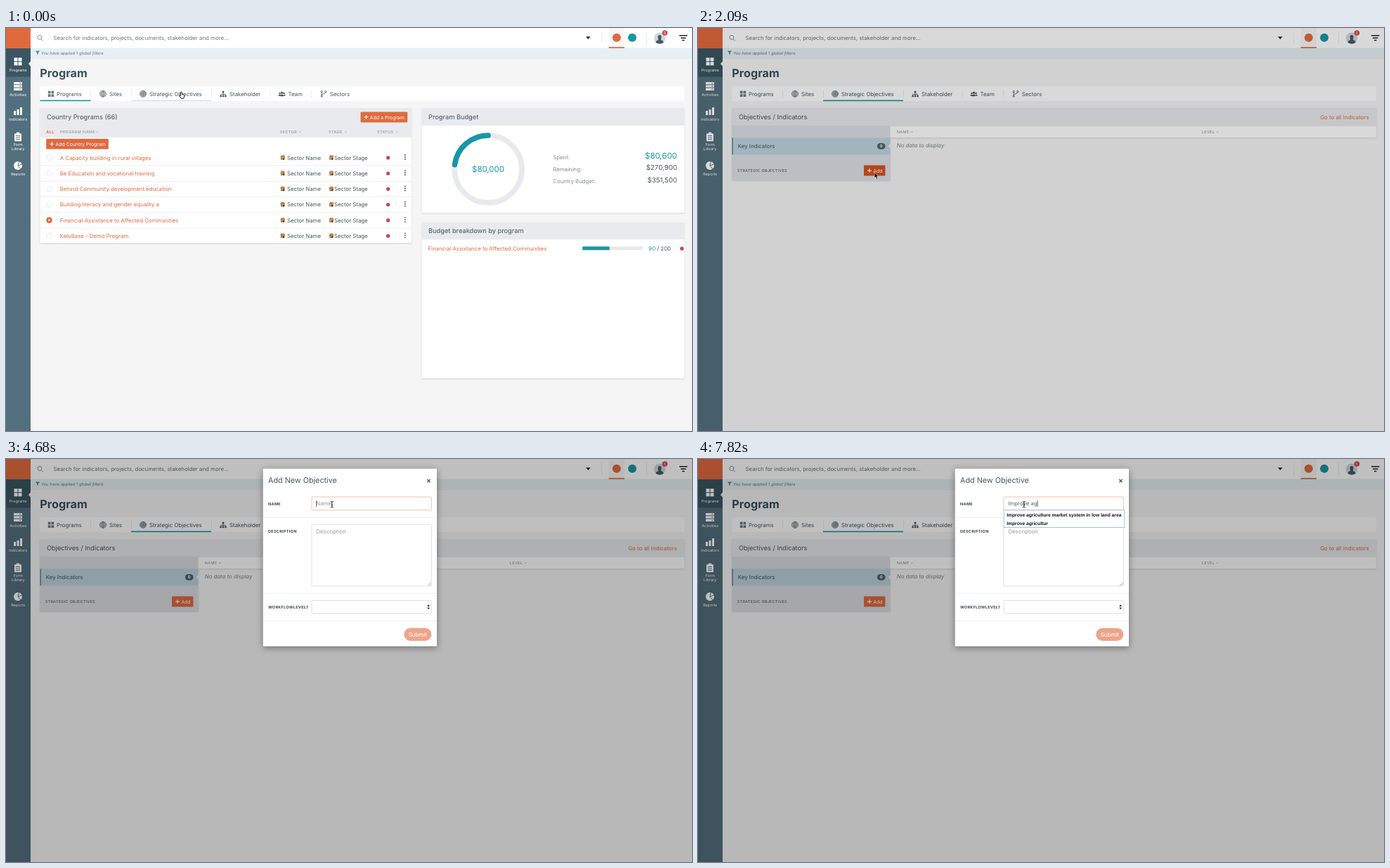
An HTML page that plays this animation: 976x574 px, repeating every 8 s.

```html
<!DOCTYPE html>
<html lang="en">
<head>
<meta charset="utf-8">
<title>Add objective</title>
<style>
  html, body { margin: 0; width: 100%; height: 100%; overflow: hidden; background: #f5f5f5; }
  svg { display: block; width: 976px; height: 574px; font-family: Inter, "Open Sans", sans-serif; text-rendering: geometricPrecision; }
  text { white-space: pre; }
  .caps { font-size: 5.5px; letter-spacing: .4px; }
  .mid { text-anchor: middle; }
  .end { text-anchor: end; }
  .bold { font-weight: 700; }
  .italic { font-style: italic; }
  .card { filter: drop-shadow(0 1px 1px rgba(0,0,0,.12)); }
  #modal { filter: drop-shadow(0 2px 5px rgba(0,0,0,.4)); }
  #list text { font-family: "Liberation Sans", Arial, sans-serif; font-weight: 700; }
</style>
</head>
<body>
<svg id="stage" viewBox="0 0 976 574"></svg>
<script>
const INK = '#46545d', GREY = '#868c91', ORANGE = '#e06a3e', TEAL = '#1796a6', SLATE = '#536f7d', PANEL = '#e8eaed', LINE = '#e6e7e9';

const text = (s, x, y, size = 7.85, fill = INK, cls = '') =>
  `<text x="${x}" y="${y}" font-size="${size}" fill="${fill}" class="${cls}">${s}</text>`;
const caps = (s, x, y, fill = GREY, cls = '') => text(s, x, y, 5.5, fill, 'caps ' + cls);
const rect = (x, y, w, h, fill, more = '') => `<rect x="${x}" y="${y}" width="${w}" height="${h}" fill="${fill}" ${more}/>`;
const dot = (x, y, r, fill, more = '') => `<circle cx="${x}" cy="${y}" r="${r}" fill="${fill}" ${more}/>`;
const path = (d, fill = 'none', stroke = 'none', width = 1, more = '') =>
  `<path d="${d}" fill="${fill}" stroke="${stroke}" stroke-width="${width}" ${more}/>`;
const group = (body, more = '') => `<g ${more}>${body}</g>`;
const place = (x, y, body) => group(body, `transform="translate(${x} ${y})"`);
const sortArrow = (x, y) => path(`M${x} ${y - .7}l1.3 1.4 1.3-1.4`, 'none', GREY, .7);
const plus = (x, y) => path(`M${x - 3} ${y}h6M${x} ${y - 3}v6`, 'none', '#fff', 1.1);
const button = (s, x, y, w, h) =>
  rect(x, y, w, h, ORANGE, 'rx="1.2" class="button"') + plus(x + 8, y + h / 2) + text(s, x + 13.3, y + h / 2 + 2.6, 6.95, '#fff');

// Icons are drawn around their own centre.
const tiles = (c, s) => [[-1, -1], [1, -1], [-1, 1], [1, 1]]
  .map(([i, j]) => rect(i * (s / 2 + .5) - s / 2, j * (s / 2 + .5) - s / 2, s, s, c)).join('');
const icons = {
  servers: [-4.4, -.1, 4.2].map(y => rect(-6, y - 1.7, 12, 3.4, '#fff', 'rx=".6"') + rect(2, y - .4, 2.6, .8, SLATE)).join(''),
  bars: rect(-6, -1, 3, 6, '#fff') + rect(-1.5, -3, 3, 8, '#fff') + rect(3, -6, 3, 11, '#fff'),
  clipboard: rect(-5, -4.8, 10, 11, '#fff', 'rx="1"') + rect(-2.2, -6.4, 4.4, 2.8, '#fff', 'rx="1"') +
    path('M-3-1.5h6M-3 1h6M-3 3.5h6', 'none', SLATE, .9),
  pie: dot(0, 0, 6, '#fff') + path('M0 0L1.5-6M0 0L5.8-2M0 0L4 5', 'none', SLATE, 1),
  globe: dot(0, 0, 4.5, 'none', `stroke="${INK}" stroke-width=".7"`) +
    path('M-4.5 0h9M0-4.5v9M-3.8-2.2h7.6M-3.8 2.2h7.6M0-4.5q-4.4 4.5 0 9q4.4-4.5 0-9', 'none', INK, .6),
  target: dot(0, 0, 4.5, '#bfc4c8', `stroke="${INK}" stroke-width=".7"`) + dot(0, 0, 2.6, 'none', `stroke="${INK}" stroke-width=".7"`) +
    dot(0, 0, 1, INK) + path('M0 0V-4.5A4.5 4.5 0 0 1 4.2 1.5Z', '#8b959b'),
  tree: dot(0, -2.8, 1.5, INK) + path('M0-2V3M-3.4 3V.6H3.4V3', 'none', INK, .8) + [-3.4, 0, 3.4].map(x => rect(x - 1.2, 2, 2.4, 2.4, INK)).join(''),
  people: [[-3, -.8, 1.2], [3, -.8, 1.2], [0, -1.6, 1.6]].map(([x, y, r]) => dot(x, y, r, INK)).join('') +
    path('M-5 3V1.6q2-1.5 3.2 0V3ZM5 3V1.6q-2-1.5-3.2 0V3ZM-2.4 3.4V2q2.4-2.4 4.8 0V3.4Z', INK),
  branch: path('M-2.6-3V3.2M-2.6 2q0-1.7 2.6-2T3-3', 'none', INK, .8) + [[-2.6, -3.2], [-2.6, 3.4], [3, -3.2]].map(([x, y]) => dot(x, y, 1.2, '#fff', `stroke="${INK}" stroke-width=".8"`)).join(''),
  building: path('M-3.2-1.8L-2-3.4H2L3.2-1.8V0H-3.2Z', '#b98a44') + rect(-2.8, 0, 5.6, 3, '#8d6a3d') + rect(-1.8, .7, 1.3, 1.2, '#e8d3a2') + rect(.5, .7, 1.3, 2.3, '#4f3a24'),
  funnel: path('M-3.2-2.6h6.4L.8.2V2.6l-1.6-.6V.2Z', '#6c8590'),
};

function sidebar() {
  const items = [
    [47.8, tiles('#fff', 5), ['Programs', 61.5]], [83, icons.servers, ['Activities', 97]],
    [119, icons.bars, ['Indicators', 132.3]], [155, icons.clipboard, ['Form', 168.4], ['Library', 174.2]],
    [196, icons.pie, ['Reports', 209.7]],
  ];
  return rect(0, 0, 35, 574, SLATE) + rect(0, 0, 35, 29, ORANGE) + rect(0, 29, 35, 40.5, '#3b5562') +
    path('M35 47.5l-3 3.5 3 3.5Z', '#f5f5f5') +
    items.map(([y, icon, ...labels]) => place(17, y, icon) +
      labels.map(([s, ly]) => text(s, 17.2, ly, 5.5, '#fff', 'mid')).join('')).join('');
}

function header() {
  return rect(35, 0, 941, 29, '#fff') + rect(35, 28.5, 941, 14.5, '#e5f0f3') + rect(35, 43, 941, .6, '#dfe6e8') +
    path('M50.2 15.8l2.5 2.6', 'none', '#7d868c', 1) + dot(47.9, 13.4, 3, 'none', 'stroke="#7d868c" stroke-width=".9"') +
    text('Search for indicators, projects, documents, stakeholder and more...', 67.5, 16.8, 7.85, '#6d7479') +
    path('M825 12.3h6.6l-3.3 3.6Z', '#222') + rect(847.5, 5, .7, 18, '#dfe1e3') + rect(911.2, 5, .7, 18, '#dfe1e3') +
    rect(857.5, 0, 22.5, 28.5, '#f7f7f7') + rect(857.5, 27, 22.5, 1.7, ORANGE) +
    dot(868.8, 13.8, 6, ORANGE) + dot(891, 13.8, 6, TEAL) +
    dot(930, 14.6, 8.2, '#cfd8dd') + path('M924.5 20.7q.4-3 3.5-3.4v-1.5q-1.8-5.8 2-5.8t2 5.8v1.5q3.1.4 3.5 3.4q-5.5 3.6-11 0Z', '#455a66') +
    dot(937.4, 7, 3.8, '#d9434e') + text('5', 937.4, 8.9, 5.2, '#fff', 'mid') +
    path('M958 10.8h11.4M960 14.2h7.4M962 17.6h3.4', 'none', '#222', 1.5) +
    place(45, 35.2, icons.funnel) + text('You have applied 1 global filters', 50, 37.7, 5.9, '#60757f', 'italic') +
    text('Program', 48.3, 70, 16.2, '#35515e', 'bold');
}

function tabs() {
  const list = [[64, tiles('#6f787d', 3.7), 'Programs', 72], [138, icons.globe, 'Sites', 147], [195, icons.target, 'Strategic Objectives', 204],
    [309, icons.tree, 'Stakeholder', 318], [392.5, icons.people, 'Team', 401.5], [451.8, icons.branch, 'Sectors', 460.7]];
  return rect(48.5, 83, 916.5, 21, '#fff') +
    list.map(([x, icon, s, tx]) => place(x, 93.8, icon) + text(s, tx, 96.6)).join('') +
    [120.5, 178, 292, 375.7, 434.5].map(x => rect(x, 88, .6, 11.5, '#dcdfe1')).join('');
}

function programs() {
  const names = ['A Capacity building in rural villages', 'Be Education and vocational training', 'Behind Community development education',
    'Building literacy and gender equality a', 'Financial Assistance to Affected Communities', 'KeluBase - Demo Program'];
  const row = (name, i) => {
    const y = 184.6 + i * 22.27, chosen = i === 4;
    return dot(61.5, y, 4, chosen ? ORANGE : '#fff', `stroke="${chosen ? ORANGE : '#dddfe1'}" stroke-width=".7"`) +
      (chosen ? dot(61.5, y, 1.3, '#fff') : '') + text(name, 76.7, y + 2.9, 7.82, ORANGE) +
      place(393.7, y, icons.building) + text('Sector Name', 400, y + 2.9, 7.82) +
      place(463, y, icons.building) + text('Sector Stage', 467, y + 2.9, 7.82) + dot(543.6, y + .2, 2.6, '#cb4449') +
      [-3.6, -.6, 2.4].map(d => dot(567.8, y + d, .95, '#4b5359')).join('') + rect(48.5, y + 11, 528.5, .7, LINE);
  };
  const amount = (label, value, y, size, fill) => text(label, 778.3, y + 1.5, 7.8, GREY) + text(value, 954.8, y, size, fill, 'end');
  const a = 82.5 * Math.PI / 180, r = 48;
  return rect(48.5, 102.6, 72, 1.6, TEAL) + rect(178, 103.2, 114, .8, '#b9d9de') +
    group(rect(48.5, 114, 528.5, 192, '#fff') + rect(48.5, 114, 528.5, 42, PANEL), 'class="card"') +
    text('Country Programs (66)', 58, 130.2, 9.26) + button('Add a Program', 504.5, 119.5, 66.7, 15) +
    caps('ALL', 57.3, 149.8, ORANGE, 'bold') +
    [['PROGRAM NAME', 76.7, 128.6], ['SECTOR', 389.8, 417], ['STAGE', 459, 482], ['STATUS', 528, 555]]
      .map(([s, x, ax]) => caps(s, x, 149.8) + sortArrow(ax, 148)).join('') +
    button('Add Country Program', 57.2, 157.8, 88.6, 14.8) + names.map(row).join('') +
    group(rect(591.5, 114, 373.5, 149, '#fff') + rect(591.5, 277, 373.5, 222, '#fff'), 'class="card"') +
    rect(591.5, 114, 373.5, 25, PANEL) + rect(591.5, 277, 373.5, 24.3, PANEL) +
    text('Program Budget', 601, 130.2, 9.28) + text('Budget breakdown by program', 601, 292.4, 9.28) +
    dot(686, 201, r, 'none', 'stroke="#e8e9ee" stroke-width="7.5"') +
    path(`M686 ${201 - r}A${r} ${r} 0 0 0 ${686 - r * Math.sin(a)} ${201 - r * Math.cos(a)}`, 'none', TEAL, 7.5, 'stroke-linecap="round"') +
    text('$80,000', 686, 205.4, 11.4, TEAL, 'mid') +
    amount('Spent:', '$80,600', 185.8, 11.4, TEAL) + amount('Remaining:', '$270,900', 202.4, 9.65, INK) + amount('Country Budget:', '$351,500', 219.7, 9.65, INK) +
    text('Financial Assistance to Affected Communities', 600.5, 316.7, 7.82, ORANGE) +
    rect(820.3, 311.3, 85.5, 5, '#e6e8ea') + rect(820.3, 311.3, 38.3, 5, TEAL) +
    text(`<tspan fill="${TEAL}">90</tspan> / 200`, 914.3, 316.7) + dot(961.6, 314.2, 2.6, '#cb4449');
}

function objectives() {
  return rect(178, 102.6, 114, 1.6, TEAL) +
    group(rect(48.5, 114, 916.5, 25, PANEL) + rect(48.5, 139, 225, 78, '#dcdfe4') + rect(273.5, 139, 691.5, 17, '#fff'), 'class="card"') +
    rect(48.5, 139, 916.5, .6, '#dadde0') + rect(273.5, 156, 691.5, .6, '#dfe1e3') +
    text('Objectives / Indicators', 58, 130.2, 9.2) + text('Go to all Indicators', 954.6, 129.8, 7.86, ORANGE, 'end') +
    rect(48.5, 156.3, 225, 24, '#bdd4df') + rect(48.5, 156.3, 1.2, 24, '#48707f') + path('M273.8 165l-3 3.2 3 3.2Z', '#f5f5f5') +
    text('Key Indicators', 56.8, 171.3) + rect(255, 164, 11.5, 8.7, '#4a6573', 'rx="4.3"') + text('0', 260.8, 170.4, 5.8, '#fff', 'mid bold') +
    `<text x="56" y="205.2" font-size="5.5" letter-spacing=".25" fill="${INK}">STRATEGIC OBJECTIVES</text>` +
    group(button('Add', 236, 195.6, 30.4, 15), 'id="add"') +
    caps('NAME', 282.8, 149.8) + sortArrow(303, 148) + caps('LEVEL', 716.7, 149.8) + sortArrow(737.7, 148) +
    text('No data to display', 282.8, 170.3, 7.8, '#7b8186', 'italic');
}

function modal() {
  const field = (y, h, more = '') => rect(435, y, 170.3, h, '#fff', `rx="1.2" stroke="#d3d6d8" stroke-width=".8" ${more}`);
  const label = (s, y) => `<text x="373" y="${y}" font-size="5.5" letter-spacing=".3" class="bold" fill="#3e474d">${s}</text>`;
  return rect(365.7, 13.8, 247.3, 253, '#fff', 'rx="1.5"') + text('Add New Objective', 373, 34.4, 10.77) +
    path('M599.4 29l4.2 4.2M603.6 29l-4.2 4.2', 'none', '#4d555a', 1.3) +
    [83, 191.3, 230.2].map(y => rect(365.7, y, 247.3, .7, LINE)).join('') +
    label('NAME', 65.6) + label('DESCRIPTION', 104.7) + label('WORKFLOWLEVEL1', 213.1) +
    field(54, 18.8, 'id="nameField"') + field(93.2, 87.8) + field(201.6, 18.6) +
    text('Description', 441.3, 105.5, 7.9, '#96999c') + path('M604.3 176l-4 4M604.3 178.3l-1.8 1.8', 'none', '#777', .6) +
    path('M599.3 209.9l1.8-2.8 1.8 2.8ZM599.3 211.6l1.8 2.8 1.8-2.8Z', '#333') +
    rect(566.3, 240.7, 39, 18.3, '#eea48a', 'rx="9.1"') + text('Submit', 585.8, 252.9, 8, '#fff', 'mid') +
    text('', 441.3, 66.3, 7.85, INK, 'typed') + rect(441, 59, .7, 9, '#333', 'id="caret"') + group('', 'id="list"');
}

const cursors = {
  hand: path('M-1.2-4.2q1-.9 1.7.1V-1.4L3-.7q1.3.5 1 1.8L3.2 4.5H-.7L-3.2 1.2q-.2-1.1 1-.7l1 .7Z', '#fff', '#111', .9),
  arrow: path('M0 0V8.4L1.9 6.7 3.2 9.6 4.7 8.9 3.4 6.1H6Z', '#000', '#fff', .6),
  beam: path('M-2-4.3q2 0 2 1.2V3q0 1.2-2 1.2M2-4.3Q0-4.3 0-3.1M0 3q0 1.2 2 1.2M-1 .8h2', 'none', '#111', .9),
};

const stage = document.getElementById('stage');
stage.innerHTML = rect(0, 0, 976, 574, '#f5f5f5') + header() + sidebar() + tabs() + group(programs(), 'id="programs"') +
  group(objectives(), 'id="objectives"') + rect(0, 0, 976, 574, '#000', 'id="shade"') + group(modal(), 'id="modal"') + group('', 'id="pointer"');

const $ = s => stage.querySelector(s);
const show = (s, on) => $(s).setAttribute('display', on ? 'inline' : 'none');
const at = (steps, t) => steps.findLast(([start]) => start <= t)[1];

const best = 'Improve agriculture market system in low land area', short = 'Improve agricultur', community = 'Improve community livelihood opportunities';
const track = {
  shade: [[0, 0], [2090, .15], [2480, .25]],
  typed: [[0, ''], [5370, 'I'], [5730, 'Im'], [6090, 'Imp'], [7100, 'Improv'], [7460, 'Improve '], [7820, 'Improve ag']],
  caret: [[0, false], [3700, true], [4350, false], [4680, true], [6740, false], [7100, true]],
  list: [[0, []], [5370, [best, 'Implementation Roadmap', short, community]], [7100, [best, short, community]], [7820, [best, short]]],
  // Each pointer is shape, x, y, opacity.
  pointer: [[0, [['hand', 249.7, 95.6]]], [900, [['hand', 249.7, 95.6, .5], ['arrow', 253.5, 179.5, .5]]], [1410, [['arrow', 251, 206]]],
    [1730, [['hand', 252.3, 211]]], [2090, [['arrow', 251, 205.6]]], [2480, [['arrow', 251, 202.5, .6], ['arrow', 251.5, 204.5, .8]]],
    [3070, [['beam', 475.5, 55.6]]], [3700, [['beam', 463.8, 64.8]]]],
};

function render(t) {
  const typed = at(track.typed, t), items = at(track.list, t), focused = t >= 3700;
  show('#programs', t < 360);
  show('#objectives', t >= 360);
  $('#add .button').setAttribute('fill', t >= 1730 && t < 3070 ? '#d4511f' : ORANGE);
  $('#shade').setAttribute('opacity', at(track.shade, t));
  show('#modal', t >= 2480);
  $('#nameField').setAttribute('stroke', focused ? '#eeb295' : '#d3d6d8');

  const input = $('.typed');
  input.textContent = typed || 'Name';
  input.setAttribute('fill', typed ? '#5a6369' : '#96999c');
  show('#caret', at(track.caret, t));
  $('#caret').setAttribute('x', 441.3 + (typed ? input.getComputedTextLength() : 0));

  $('#list').innerHTML = items.length
    ? rect(435.2, 72.8, 171.2, items.length * 11.9 + .8, '#fff', 'stroke="#86b4e4" stroke-width=".8"') +
      items.map((s, i) => text(s, 439.2, 81.9 + i * 11.9, 6.7, '#111')).join('')
    : '';
  $('#pointer').innerHTML = at(track.pointer, t)
    .map(([shape, x, y, opacity = 1]) => group(place(x, y, cursors[shape]), `opacity="${opacity}"`)).join('');
}

const begin = performance.now();
function tick() {
  render((performance.now() - begin) % 8000);
  requestAnimationFrame(tick);
}
tick();
</script>
</body>
</html>
```
